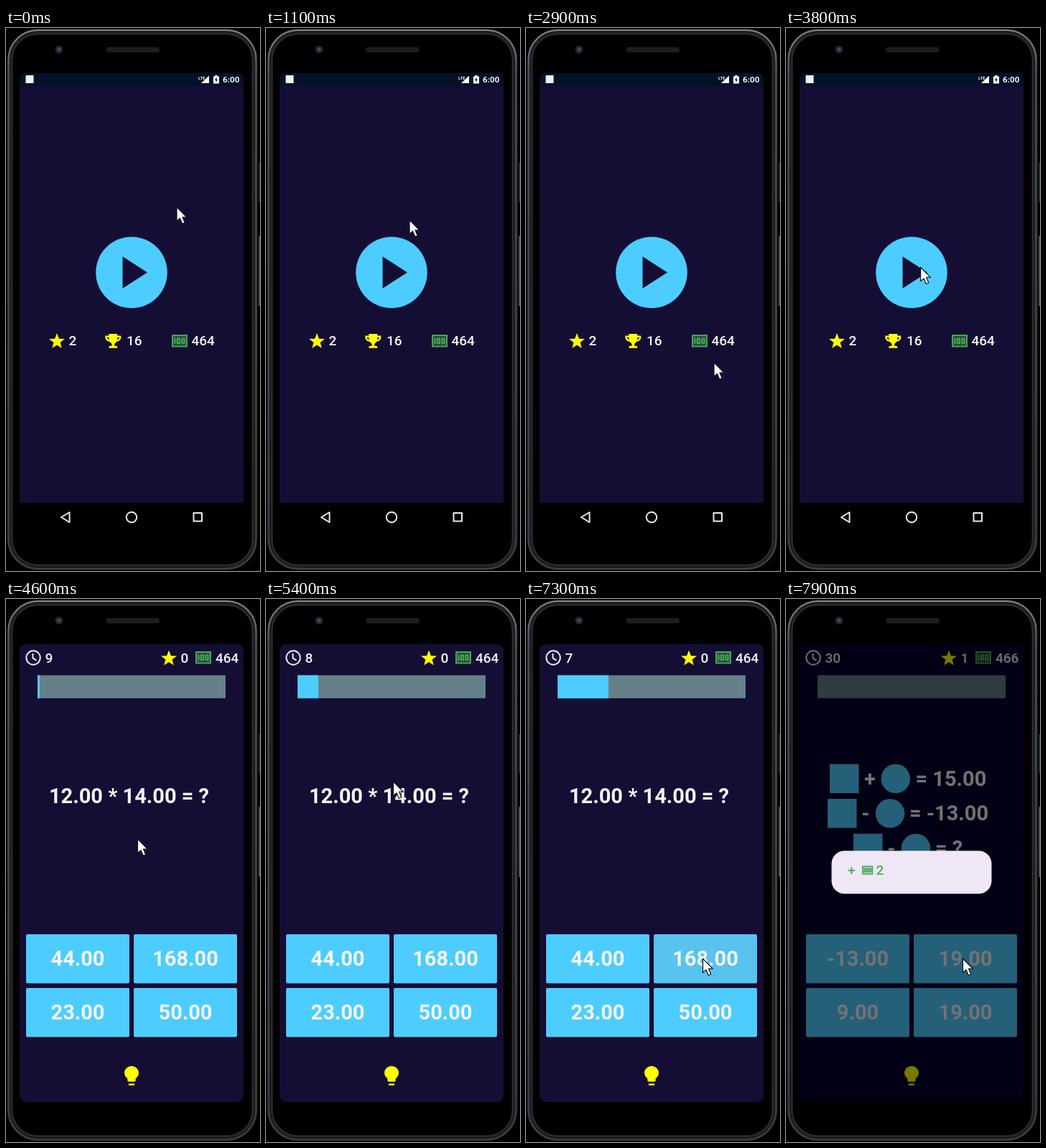
These frames come from a looping animation (354 px wide and 758 px high, 8000 ms). An HTML page:

```html
<!DOCTYPE html>
<html lang="en">
<head>
<meta charset="utf-8">
<title>Maths quiz</title>
<style>
  html, body { margin: 0; width: 100%; height: 100%; overflow: hidden; background: #000; }
  svg { display: block; width: 354px; height: 758px; }
  text { font-family: Roboto, "Liberation Sans", sans-serif; font-size: 19px; font-weight: 500; fill: #f4f4f8; white-space: pre; }
  .big { font-size: 29px; font-weight: 700; }
  .mid { text-anchor: middle; }
  .blue { fill: #4dcdff; }
  .navy { fill: #140e34; }
  .yellow { fill: #ffff00; }
  .green { fill: #45a551; }
  .line { fill: none; stroke: #ececec; stroke-width: 2; stroke-linejoin: round; }
</style>
</head>
<body>
<svg viewBox="0 0 354 758">
  <defs>
    <linearGradient id="rim" x1="0" y1="0" x2="0" y2="1">
      <stop offset="0" stop-color="#85878a"/>
      <stop offset=".08" stop-color="#55585b"/>
      <stop offset="1" stop-color="#3f4245"/>
    </linearGradient>
    <path id="star" d="M0-11.5L2.9-3.8L11-3.5L4.6 1.6L6.8 9.4L0 4.9L-6.8 9.4L-4.6 1.6L-11-3.5L-2.9-3.8Z"/>
    <g id="money">
      <path d="M1 1h18v14H1z" opacity=".35"/>
      <path d="M3 4h2v8H3zm7 0H7c-.55 0-1 .45-1 1v6c0 .55.45 1 1 1h3c.55 0 1-.45 1-1V5c0-.55-.45-1-1-1zm-1 6H8V6h1v4zm7-6h-3c-.55 0-1 .45-1 1v6c0 .55.45 1 1 1h3c.55 0 1-.45 1-1V5c0-.55-.45-1-1-1zm-1 6h-1V6h1v4zM0 0v16h20V0H0zm2 14V2h16v12H2z"/>
    </g>
    <path id="trophy" d="M552 64H448V24c0-13-11-24-24-24H152c-13 0-24 11-24 24v40H24C11 64 0 75 0 88v56c0 36 22 72 62 101 31 22 70 37 110 41C203 339 240 360 240 360v72h-48c-35 0-64 21-64 56v12c0 7 5 12 12 12h296c7 0 12-5 12-12v-12c0-35-29-56-64-56h-48v-72s37-21 68-74c40-4 79-19 110-41 40-29 62-65 62-101V88c0-13-11-24-24-24zM99 193C75 175 64 156 64 144v-16h64c1 33 6 61 13 86-15-5-29-12-42-21zM512 144c0 16-18 36-35 49-13 9-27 16-42 21 7-25 12-53 13-86h64v16z"/>
    <path id="bulb" d="M-3 9c0 .55.45 1 1 1h4c.55 0 1-.45 1-1v-1h-6v1zM0-10c-3.86 0-7 3.14-7 7 0 2.38 1.19 4.47 3 5.74V5c0 .55.45 1 1 1h6c.55 0 1-.45 1-1V2.74C5.81 1.47 7-.62 7-3c0-3.86-3.14-7-7-7z"/>
  </defs>

  <rect width="354" height="758"/>
  <g id="phone" fill="none">
    <path d="M353 188V243" stroke="#26282a" stroke-width="2"/>
    <path d="M353 290V388" stroke="#4a4c4e" stroke-width="2"/>
    <rect x="1.5" y="1.5" width="349" height="755" rx="43" fill="#1d1f21"/>
    <rect x="3.5" y="3" width="345" height="752" rx="41" stroke="url(#rim)" stroke-width="2"/>
    <rect x="8.5" y="8.5" width="335" height="741" rx="36" fill="#000" stroke="#303336" stroke-width="1.5"/>
    <circle cx="74" cy="30" r="5.5" fill="#25252c"/>
    <circle cx="74" cy="30" r="2.5" fill="#484660"/>
    <rect x="139" y="26.5" width="75" height="7.5" rx="3.7" fill="#1c1d1f"/>
  </g>

  <g id="menu">
    <path class="navy" d="M19 81H331V663H19Z"/>
    <path fill="#021228" d="M19 81V72q0-9 9-9H322q9 0 9 9V81Z"/>
    <rect x="27.5" y="66" width="11" height="11" fill="#f2f2f2"/>
    <path fill="#fff" d="M272 77L283 66.5V77Z"/>
    <text x="268" y="71.5" style="font-size:6px;font-weight:700">LTE</text>
    <path fill="#fff" d="M289 67.5h2.3v-1.5h3.4v1.5h2.3v10h-8z"/>
    <path fill="#021228" d="M293.7 68.5L291 73h1.6v3L295 71.8h-1.6z"/>
    <text x="302" y="76" style="font-size:11.7px;font-weight:700">6:00</text>
    <circle class="blue" cx="175" cy="341.3" r="49.8"/>
    <path class="navy" d="M162.5 319V363.5L197 341.3Z"/>
    <use href="#star" class="yellow" x="71" y="437.5"/>
    <text x="87.5" y="443">2</text>
    <use href="#trophy" class="yellow" transform="translate(138.3 427) scale(.0382 .0386)"/>
    <text x="168" y="443">16</text>
    <use href="#money" class="green" transform="translate(231 428) scale(1.1)"/>
    <text x="258.5" y="443">464</text>
    <path class="line" d="M77 683L88.5 676V690Z"/>
    <circle class="line" cx="175" cy="683" r="7.2"/>
    <rect class="line" x="261.5" y="677" width="11.5" height="11.5"/>
  </g>

  <g id="game">
    <rect id="back" class="navy" x="19" y="63" width="312" height="639" rx="9"/>
    <circle class="line" cx="38" cy="82" r="9.7"/>
    <path class="line" d="M37.5 76V82.7L42.5 85.7"/>
    <text id="clock" x="54.5" y="88.5"></text>
    <use href="#star" class="yellow" x="227" y="83"/>
    <text id="stars" x="243.5" y="88.5"></text>
    <use href="#money" class="green" transform="translate(264 73) scale(1.1)"/>
    <text id="coins" x="292" y="88.5"></text>
    <rect x="44" y="106.5" width="262" height="32" fill="#66808a"/>
    <rect id="bar" class="blue" x="44" y="106.5" height="32"/>
    <text id="sum" class="big mid" x="171.5" y="285">12.00 * 14.00 = ?</text>
    <g id="puzzle"></g>
    <g id="answers"></g>
    <use href="#bulb" class="yellow" transform="translate(175 665.5) scale(1.42 1.36)"/>
    <g id="overlay">
      <rect x="19" y="63" width="312" height="639" rx="9" fill="#000" opacity=".53"/>
      <rect x="63.5" y="351.5" width="223" height="60" rx="18" fill="#efe6f6"/>
      <text x="86" y="385" style="fill:#45b551">+</text>
      <use href="#money" class="green" transform="translate(106 372.5) scale(.76)"/>
      <text x="125.5" y="385" style="fill:#45b551">2</text>
    </g>
  </g>

  <path id="cursor" fill="#fff" stroke="#15121f" stroke-width="1.2" stroke-linejoin="round"
        d="M0 0V19.5L4.4 15.6L7.7 23.2L11.2 21.7L8 14.2H13.8Z"/>
</svg>
<script>
const LOOP = 8000, STEP = 100;
const $ = id => document.getElementById(id);

// time, x, y of the pointer tip
const POINTER = [
  [200, 238, 250], [450, 165, 169], [700, 67, 232], [900, 118, 303], [1100, 200, 268],
  [1300, 196, 234], [1600, 136, 285], [2000, 147.6, 338],
  [2300, 97, 400], [2600, 165, 462], [2900, 262, 467],
  [3300, 240, 390], [3800, 187.6, 334], [4400, 187.6, 334],
  [4600, 183.5, 335], [5000, 180, 290], [5400, 177.5, 255],
  [5700, 200, 264], [6100, 190, 322], [6500, 205, 405], [7000, 246.5, 502], [8000, 246.5, 502]
];

// Progress bar width over time
const BAR = [[4480, 0], [4600, 3], [5400, 29], [7000, 71]];

const answerSlots = [[28, 468], [178, 468], [28, 543], [178, 543]];
$('answers').innerHTML = answerSlots.map(([x, y]) =>
  `<rect class="blue" x="${x}" y="${y}" width="144" height="68.5" rx="2"/>
   <text class="big mid" x="${x + 72}" y="${y + 44}"></text>`).join('');
const labels = [...$('answers').querySelectorAll('text')];
const buttons = [...$('answers').querySelectorAll('rect')];

const puzzleRow = (x, y, sign, signX, circleX, resultX, result) =>
  `<rect class="blue" x="${x}" y="${y - 20.3}" width="40.5" height="40.5"/>
   <text class="big mid" x="${signX}" y="${y + 10}">${sign}</text>
   <circle class="blue" cx="${circleX}" cy="${y}" r="20.3"/>
   <text class="big" x="${resultX}" y="${y + 10}">${result}</text>`;
$('puzzle').innerHTML =
  puzzleRow(61, 250.8, '+', 117, 152.8, 180.5, '= 15.00') +
  puzzleRow(58, 299.3, '-', 111, 145, 172, '= -13.00') +
  puzzleRow(94, 348, '-', 147, 181, 208, '= ?');

function segment(keys, t) {
  let i = 0;
  while (i < keys.length - 2 && t >= keys[i + 1][0]) i++;
  const [a, b] = [keys[i], keys[i + 1]];
  return [i, Math.min(1, Math.max(0, (t - a[0]) / (b[0] - a[0])))];
}

function linear(keys, t) {
  const [i, u] = segment(keys, t);
  return keys[i][1] + (keys[i + 1][1] - keys[i][1]) * u;
}

// Hermite curve with time-aware tangents; the pointer rests where neighbours coincide
function pointerAt(t) {
  const [i, u] = segment(POINTER, t);
  const a = POINTER[i], b = POINTER[i + 1], span = b[0] - a[0];
  const same = (p, q) => p[1] === q[1] && p[2] === q[2];
  const slope = (k, axis) => {
    const p = POINTER[k - 1], c = POINTER[k], n = POINTER[k + 1];
    if (!p || !n || same(p, c) || same(c, n)) return 0;
    return (n[axis] - p[axis]) / (n[0] - p[0]);
  };
  const u2 = u * u, u3 = u2 * u;
  return [1, 2].map(axis =>
    (2 * u3 - 3 * u2 + 1) * a[axis] + (3 * u2 - 2 * u3) * b[axis] +
    span * ((u3 - 2 * u2 + u) * slope(i, axis) + (u3 - u2) * slope(i + 1, axis)));
}

const show = (id, on) => $(id).setAttribute('display', on ? 'inline' : 'none');

function render(time) {
  const t = Math.floor(time / STEP) * STEP;
  const playing = t >= 4400, solved = t >= 7500;
  const width = solved ? 0 : linear(BAR, t);

  show('menu', !playing);
  show('game', playing);
  show('sum', !solved);
  show('puzzle', solved);
  show('overlay', solved);
  $('overlay').setAttribute('opacity', t < 7600 ? 0.5 : 1);
  $('back').style.fill = solved ? '#03002c' : '';

  $('bar').setAttribute('width', width);
  $('clock').textContent = solved ? 30 : Math.min(9, Math.floor(10 - width / 26.1));
  $('stars').textContent = solved ? 1 : 0;
  $('coins').textContent = solved ? 466 : 464;
  const answers = solved ? ['-13.00', '19.00', '9.00', '19.00'] : ['44.00', '168.00', '23.00', '50.00'];
  labels.forEach((label, i) => label.textContent = answers[i]);
  buttons[1].style.fill = t >= 6900 && !solved ? '#58c3ee' : '';

  const [x, y] = pointerAt(t);
  $('cursor').setAttribute('transform', `translate(${x.toFixed(1)} ${y.toFixed(1)})`);
}

const start = performance.now();
function tick() {
  render((performance.now() - start) % LOOP);
  requestAnimationFrame(tick);
}
tick();
</script>
</body>
</html>
```
